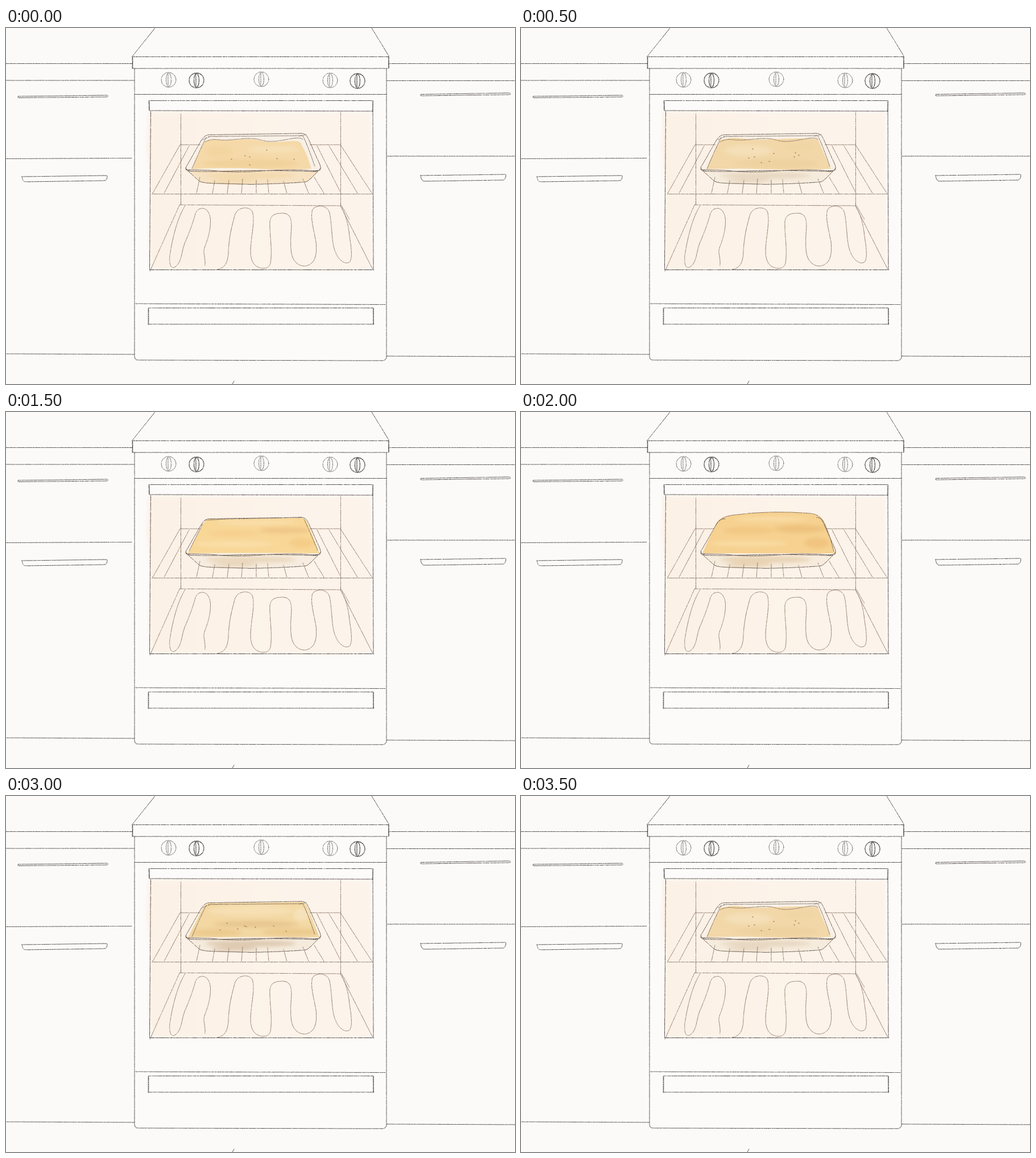
An HTML page for the animation above (4000 ms loop, 895x625 px).

```html
<!DOCTYPE html>
<html lang="en">
<head>
<meta charset="utf-8">
<title>Baking</title>
<style>
  html, body { margin: 0; height: 100%; overflow: hidden; background: #fbfaf8; }
  svg { display: block; }
  .ink { fill: none; stroke: #43393b; stroke-width: 1; stroke-linecap: round; stroke-linejoin: round; filter: url(#pencil); }
  .warm { stroke: #806c5a; stroke-width: .95; }
  .rim { stroke: #584a42; }
  .bold { stroke-width: 1.6; }
  .fine { stroke-width: .8; }
</style>
</head>
<body>
<svg width="895" height="625" viewBox="0 0 895 625">
  <defs>
    <filter id="pencil" filterUnits="userSpaceOnUse" x="0" y="0" width="895" height="625" color-interpolation-filters="sRGB">
      <feTurbulence type="fractalNoise" baseFrequency=".7" numOctaves="2" seed="4"/>
      <feColorMatrix values="0 0 0 0 0  0 0 0 0 0  0 0 0 0 0  2 0 0 0 -.2"/>
      <feComposite in="SourceGraphic" operator="in"/>
    </filter>
    <filter id="soft" x="-20%" y="-50%" width="140%" height="200%"><feGaussianBlur stdDeviation="3"/></filter>
    <filter id="edge"><feGaussianBlur stdDeviation=".7"/></filter>
    <linearGradient id="heat">
      <stop offset="0" stop-color="#fcf1e5"/>
      <stop offset=".5" stop-color="#fcf3e9"/>
      <stop offset="1" stop-color="#fcf3eb"/>
    </linearGradient>
  </defs>

  <path d="M222 50H673V71H669V577Q669 584 661 584L232 583Q226 583 226 576V71H222Z" fill="#fcfbfa"/>
  <path d="M250 147H642L645 424Q580 430 500 426L256 424Q250 400 252 330T247 215Z" fill="url(#heat)" filter="url(#soft)"/>

  <g class="ink">
    <path d="M0 62.5H222M0 92H225M0 229.5L221 228.5M0 572L225 573M673 62.5H895M670 92.5H895M670 225H895M669 576L895 577"/>
    <path d="M22 120L178 118Q181 120 178 121L22 122.500Q19 121 22 120ZM730 116.500L885 114Q889 116 886 117L730 119Q727 118 730 116.500Z"/>
    <path d="M28 261L176 259Q179 259 178 262Q177 268 173 268L34 270Q29 270 28 261ZM729 259L877 257Q880 257 879 260Q878 266 874 267L735 269Q730 268 729 259Z"/>
    <path d="M262 0L222 50M643 0L673 49M222 50.5H673M223 71H673M226 116.500H669M228 484L668 485.500"/>
    <path d="M226 71V576Q226 583 232 583L661 584Q669 584 669 577V71"/>
    <path d="M252 127.500H645M252 145L645 146M251 491.500H646M250 520H647M252 424.500H647M398 625L401 620"/>
    <path class="bold" d="M222.500 50V71M673 50V70M251.500 128L252 144M645 128V146M250.500 492V520M646 492V520"/>
    <path d="M254.500 146L252.500 424M645 146L646 423"/>
    <g id="knobs"></g>
  </g>

  <g class="ink warm">
    <path d="M307.500 150V310M588.500 146V312M305 310.500L590 312M305 311L253 427M588 312L645 424M590 312L604 336"/>
    <path d="M306 205H588M257 291.500H645M306 205L257 292M322 207L278 290M588 205L644 291M568 207L618 290M547 207L589 290"/>
    <path d="M315 312C303 330 293 365 288 400C286 418 292 424 298 419C310 410 308 392 315 376C326 350 329 340 333 326C338 312 358 312 359.500 337C360 358 353 375 349 386C346 395 351 402 350 417"/>
    <path d="M371 424C385 422 390 412 391 395C392 365 398 345 402 330C406 312 432 312 434 325C437 345 432 360 431 378C428 400 432 412 440 418C450 424 462 424 465 413C469 390 463 360 464 340C466 324 480 326 485 325C500 325 502 335 502 350C500 370 500 390 503 400C508 415 520 420 530 417C545 412 547 395 545 375C540 350 536 335 538 322C540 310 565 308 569 325C574 350 572 380 580 395C585 408 598 417 605 410C610 400 606 380 604 365C602 345 597 325 588 312"/>
  </g>

  <g id="stages"></g>

  <path class="ink warm" d="M341 262L335 290M367 268L363 290M392 267L389 290M416 265L414 290M440 267V290M460 266L462 290M488 269L494 290M522 265L532 290M542 262L559 290"/>
</svg>
<script>
const byId = id => document.getElementById(id);

byId("knobs").innerHTML = [[286, 91], [335, 92, 1], [449, 90], [570, 92], [618, 93, 1]].map(([x, y, dark]) =>
  `<g ${dark ? 'stroke-width="1.3"' : 'stroke="#6b6263"'}><circle cx="${x}" cy="${y}" r="13"/>
   <ellipse cx="${x}" cy="${y}" rx="4.5" ry="12"/><path d="M${x - 1} ${y - 10}V${y + 10}"/></g>`).join("");

const rim = "M317 249Q314 246 319 240L343 198Q350 186 359 187.500";
const rimRight = "M520 185Q527 185 531 193L552 240Q556 250 546 251Q500 247 450 251T360 250Q334 249 317 249";
const innerRim = "M356 190.500L522 189M352 192Q345 205 327 247M522 189Q530 205 543 243M346 196L358 191M515 190L528 187";
const front = "M320 251Q435 247 549 252L533 267Q528 271 500 272L415 275Q350 275 343 270Z";
const frontLine = "M321 252L340 269Q346 273 380 273L430 274.500Q500 273 528 270Q532 269 548 252M319 251Q350 253 400 251T545 252";
const flatTop = "M320 248L346 197Q352 187 362 188L520 186Q527 187 531 196L551 248Q436 247 320 248Z";

// Patches: [cx, cy, rx, ry, colour]; dots: flat x, y pairs.
const stages = [
  { dough: "M328 248Q334 226 349 200Q360 194 372 196T410 196T450 198T492 199T520 206Q530 222 537 247Q500 250 440 247T328 248Z",
    fill: "#f5d9a8", front: "#f6e2c3", frontShade: "#f3d9af", inner: true,
    patches: [[430, 238, 85, 8, "#f1d29b"], [470, 213, 45, 6, "#f7e0b7"], [375, 217, 24, 10, "#f3d5a0"]],
    dots: [396, 230, 428, 226, 420, 224, 428, 240, 458, 214, 476, 229, 506, 230] },
  { dough: "M327 248Q334 226 350 197Q370 191 390 194T450 195T522 195Q530 215 545 247Q500 250 440 248T327 248Z",
    fill: "#f2d7a8", front: "#f6ecdd", frontShade: "#e8d8c2", inner: true,
    patches: [[400, 215, 42, 10, "#f4dfb8"], [450, 238, 75, 8, "#eed3a0"], [490, 208, 28, 8, "#f0d5a5"]],
    dots: [407, 212, 444, 220, 400, 228, 410, 226, 422, 236, 436, 234, 482, 219, 480, 226, 488, 223] },
  { dough: flatTop, fill: "#f3d8a3", front: "#f5ebdd", frontShade: "#dfcbb2", inner: true,
    patches: [[430, 201, 75, 10, "#f6dfb3"], [440, 225, 75, 6, "#e8c791"], [370, 240, 45, 7, "#eccb8f"], [500, 239, 50, 7, "#eccb90"], [520, 208, 14, 12, "#f6e2ba"]],
    dots: [376, 235, 388, 223, 407, 233, 419, 228, 422, 229, 438, 230, 470, 228, 492, 237] },
  { dough: flatTop, fill: "#f8d797", front: "#f6ecdf", frontShade: "#ead8be",
    patches: [[490, 208, 45, 6, "#f0c888"], [400, 213, 45, 5, "#f6cf8e"], [400, 232, 70, 5, "#fadfa9"], [520, 230, 22, 9, "#f5cd88"], [440, 194, 70, 4, "#fadfac"]],
    dots: [], topLine: "M350 190Q390 187 430 187L520 185M524 188Q532 205 548 243M346 196L322 244" },
  { dough: "M319 248Q330 222 343 197Q350 184 372 181Q440 172 510 178Q527 180 534 196Q545 220 552 248Q436 248 319 248Z",
    fill: "#f6d190", front: "#f6ebdc", frontShade: "#e8d3b4",
    patches: [[490, 205, 45, 7, "#eec27e"], [400, 208, 45, 6, "#f2c783"], [400, 231, 70, 5, "#f9dba2"], [520, 230, 22, 9, "#f1c480"], [440, 188, 65, 4, "#f9dca6"]],
    dots: [], topLine: "M343 197Q350 184 372 181Q440 172 510 178Q527 180 534 196Q545 220 550 245" }
];

const ellipse = ([x, y, rx, ry, fill]) => `<ellipse cx="${x}" cy="${y}" rx="${rx}" ry="${ry}" fill="${fill}"/>`;

function drawDots(list) {
  let d = "";
  for (let i = 0; i < list.length; i += 2) d += `M${list[i]} ${list[i + 1]}l1 .6`;
  return `<path d="${d}" fill="none" stroke="#9a7a55" stroke-width="1.4" stroke-linecap="round"/>`;
}

byId("stages").innerHTML = stages.map((s, i) => `<g>
  <clipPath id="top${i}"><path d="${s.dough}"/></clipPath>
  <clipPath id="front${i}"><path d="${front}"/></clipPath>
  <path d="${flatTop}" fill="#f8f0e6"/>
  <path d="${front}" fill="${s.front}" filter="url(#edge)"/>
  <g clip-path="url(#front${i})"><g filter="url(#soft)">
    ${ellipse([430, 259, 80, 6, s.frontShade])}${ellipse([400, 268, 40, 4, s.frontShade])}
  </g></g>
  <path d="${s.dough}" fill="${s.fill}" filter="url(#edge)"/>
  <g clip-path="url(#top${i})"><g filter="url(#soft)">${s.patches.map(ellipse).join("")}</g></g>
  ${drawDots(s.dots)}
  <g class="ink rim">
    <path d="${rim}${i < 4 ? "L520 185" : ""}${rimRight}${frontLine}"/>
    <path class="fine" d="${s.inner ? innerRim : s.topLine}"/>
    <path class="bold" d="M317 246Q316 250 322 250M540 251Q553 252 553 246"/>
  </g>
  ${i < 2 ? '<path class="ink warm" d="M350 200Q360 194 372 196T410 195T450 197T492 196T522 196"/>' : ""}
</g>`).join("");

const groups = [...byId("stages").children];
const order = [0, 1, 2, 3, 4, 3, 2, 1];
const start = performance.now();
let shown = -1;

function tick() {
  const stage = order[Math.floor((performance.now() - start) / 500) % order.length];
  if (stage !== shown) {
    groups.forEach((g, i) => g.style.display = i === stage ? "" : "none");
    shown = stage;
  }
  requestAnimationFrame(tick);
}
tick();
</script>
</body>
</html>
```
